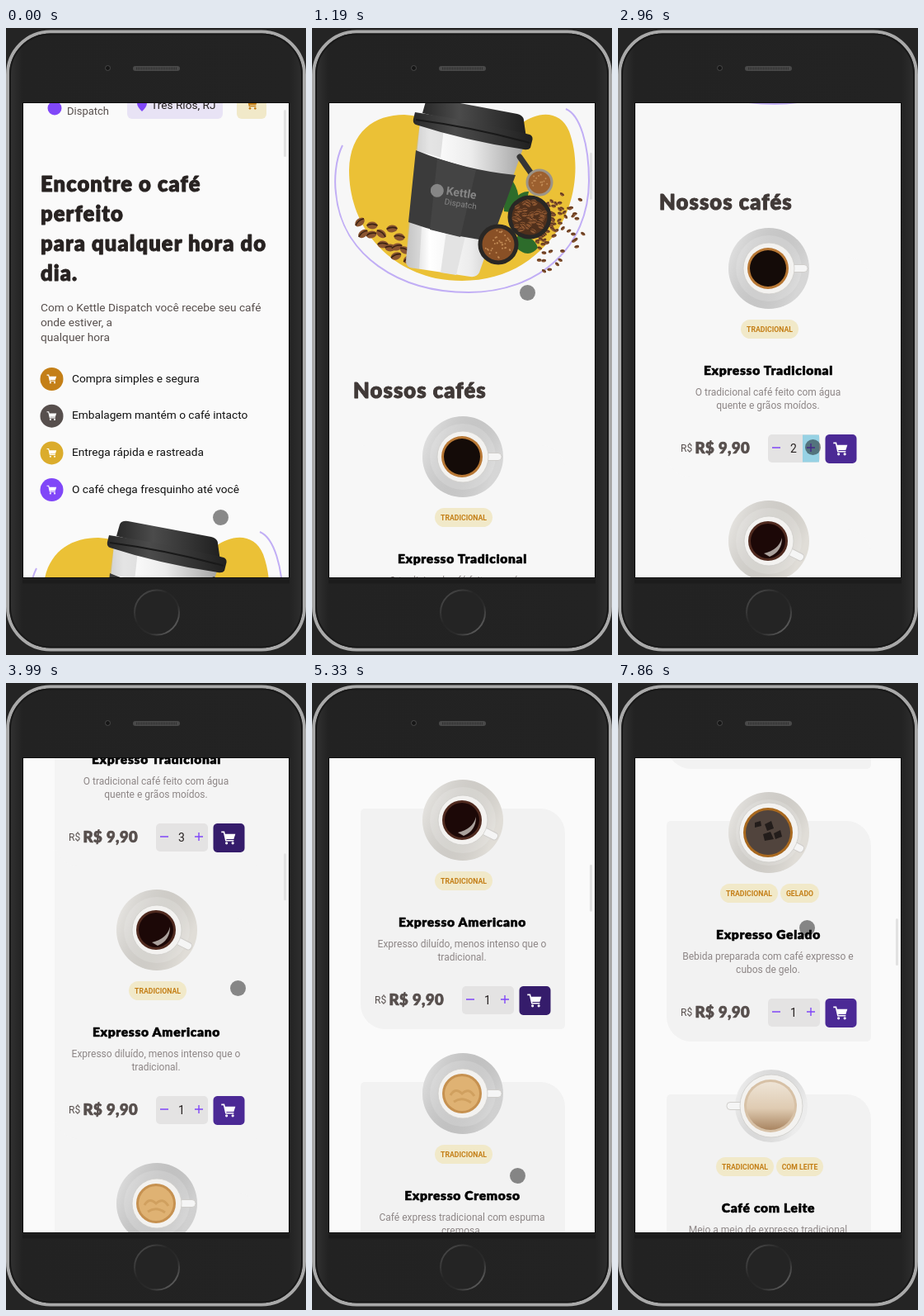
Animation, 364 px wide and 759 px high, one loop 8 s. Source, as an HTML page:

```html
<!DOCTYPE html>
<html lang="pt-BR">
<head>
<meta charset="utf-8">
<title>Cafés</title>
<style>
  html, body { margin: 0; width: 100%; height: 100%; overflow: hidden; background: #242424; }
  svg { display: block; }
  #stage { width: 364px; height: 759px; font-family: Roboto, sans-serif; }
  .display {
    font-family: Lato, sans-serif; font-weight: 900; letter-spacing: .043em;
    stroke-width: .035em; stroke-linejoin: round;
  }
  .hero { font-size: 25.5px; fill: #272221; stroke: #272221; }
  .section { font-size: 25.5px; fill: #403937; stroke: #403937; }
  .name { font-size: 15.6px; fill: #000; stroke: #000; }
  .price { font-size: 18.4px; letter-spacing: .025em; fill: #574f4d; stroke: #574f4d; }
  .lead { font-size: 13.7px; fill: #574f4d; }
  .item { font-size: 13.7px; fill: #111; }
  .desc { font-size: 12px; fill: #8d8686; }
  .tag { font-size: 8.7px; font-weight: 700; fill: #c47f17; }
  .mid { text-anchor: middle; }
  .sign { stroke: #8047f8; stroke-width: 1.4; }
</style>
</head>
<body>
<svg id="stage" viewBox="0 0 364 759">
  <defs>
    <symbol id="cart" viewBox="0 0 24 24">
      <path d="M1 3h4l3 13h12" fill="none" stroke="currentColor" stroke-width="2"/>
      <path d="M5.5 6H22.5l-2.5 8H7.5z" fill="currentColor"/>
      <circle cx="9" cy="20" r="2" fill="currentColor"/>
      <circle cx="18.5" cy="20" r="2" fill="currentColor"/>
    </symbol>
    <linearGradient id="shell">
      <stop offset="0" stop-color="#343434"/><stop offset=".05" stop-color="#222"/>
      <stop offset=".95" stop-color="#232323"/><stop offset="1" stop-color="#303030"/>
    </linearGradient>
    <linearGradient id="home" x2="1" y2="1">
      <stop offset="0" stop-color="#555"/><stop offset=".4" stop-color="#252525"/>
      <stop offset=".65" stop-color="#2b2b2b"/><stop offset="1" stop-color="#777"/>
    </linearGradient>
    <linearGradient id="lid">
      <stop offset="0" stop-color="#292929"/><stop offset=".35" stop-color="#4b4b4b"/>
      <stop offset=".7" stop-color="#343434"/><stop offset="1" stop-color="#202020"/>
    </linearGradient>
    <linearGradient id="paper">
      <stop offset="0" stop-color="#c8c8c8"/><stop offset=".2" stop-color="#fff"/>
      <stop offset=".55" stop-color="#ececec"/><stop offset="1" stop-color="#a4a4a4"/>
    </linearGradient>
    <linearGradient id="milk" x2="0" y2="1">
      <stop offset="0" stop-color="#eee4d6"/><stop offset=".55" stop-color="#dfcbb2"/>
      <stop offset="1" stop-color="#a98561"/>
    </linearGradient>
    <linearGradient id="shade" x2="1" y2=".4">
      <stop offset="0" stop-color="#fff" stop-opacity=".45"/>
      <stop offset="1" stop-color="#000" stop-opacity=".04"/>
    </linearGradient>
  </defs>

  <rect width="364" height="759" fill="#242424"/>
  <rect x="2" y="4.5" width="360" height="748" rx="52" fill="url(#shell)" stroke="#a9a9a9" stroke-width="4"/>
  <rect x="5" y="7.5" width="354" height="742" rx="49" fill="none" stroke="#191919" stroke-width="2"/>
  <circle cx="123.500" cy="48.500" r="3" fill="#161616" stroke="#4a4a4a"/>
  <rect x="154" y="46" width="57" height="6" rx="3" fill="#494949"/>
  <path d="M158 49h50" stroke="#303030" stroke-width="3" stroke-dasharray="1 1"/>
  <rect x="20" y="90" width="324" height="576" fill="#0d0d0d"/>
  <path d="M20 670h324" stroke="#1c1c1c" stroke-width="5"/>
  <circle cx="183" cy="707.500" r="27" fill="#242424" stroke="url(#home)" stroke-width="2"/>

  <svg x="21" y="91" width="322" height="574" viewBox="21 91 322 574">
    <rect id="paperBg" x="21" y="91" width="322" height="574"/>
    <rect id="strip" x="21" y="91" width="38" height="574" fill="#fafafa"/>
    <g id="page">
      <circle cx="59" cy="97" r="8.500" fill="#8047f8"/>
      <text x="74" y="105" font-size="13" fill="#574f4d">Dispatch</text>
      <rect x="147" y="74" width="116" height="36" rx="6" fill="#e8e3f5"/>
      <path d="M165 101c-4-4-6-7-6-10a6 6 0 0 1 12 0c0 3-2 6-6 10z" fill="#8047f8"/>
      <text x="176" y="98" font-size="13.700" fill="#272221">Três Rios, RJ</text>
      <rect x="280" y="74" width="36" height="36" rx="6" fill="#f1e9c9"/>
      <use href="#cart" x="290" y="84" width="16" height="16" color="#c47f17"/>

      <g class="display hero">
        <text x="42" y="198">Encontre o café</text><text x="42" y="234">perfeito</text>
        <text x="42" y="270">para qualquer hora do</text><text x="42" y="306">dia.</text>
      </g>
      <g class="lead">
        <text x="42" y="343">Com o Kettle Dispatch você recebe seu café</text>
        <text x="42" y="361">onde estiver, a</text><text x="42" y="379">qualquer hora</text>
      </g>
      <g id="perks"></g>

      <g transform="translate(0 512)">
        <path d="M45 172C46 125 76 105 112 105C155 108 200 136 238 133C256 104 298 91 312 125C328 168 318 226 286 260C254 297 206 313 150 303C88 289 45 238 45 172Z" fill="#ebc136"/>
        <path d="M37 142C28 160 27 185 29 200C36 275 105 320 190 320C275 320 336 265 336 185C336 140 325 105 308 98" fill="none" stroke="#c1aef5" stroke-width="2"/>
        <g id="beans"></g>
        <path d="M233 222q-1-22 11-36q11 17 4 38zM241 214q10-17 22-16q-2 15-17 26zM250 250q20 2 24 16q-12 15-28-2z" fill="#2d6c2b"/>
        <path d="M131 114L257 143L203 296Q200 302 192 301L119 290Q114 288 114 282Z" fill="url(#paper)"/>
        <path d="M131 114L160 121L156 157L126 148ZM117 235L133 240L130 292L119 290Q114 288 114 282Z" fill="#bbb" fill-opacity=".4"/>
        <path d="M163 246L186 252L175 299L156 296Z" fill="#e3e3e3"/>
        <path d="M126 148Q185 172 247 178L218 258Q165 252 117 235Z" fill="#3b3b3b"/>
        <path d="M152 158L199 172L180 253L143 244Z" fill="#444"/>
        <path d="M134 103L138 89Q140 84 148 85L249 104Q257 106 257 112L260 133Z" fill="url(#lid)"/>
        <path d="M125 102Q194 112 264 129Q269 131 267 137L265 145Q263 148 257 147Q188 137 126 117Q122 115 123 110Z" fill="url(#lid)"/>
        <path d="M126 111Q194 120 264 139" fill="none" stroke="#191919" stroke-width="2"/>
        <g transform="rotate(9 153 196)" fill="#868686">
          <circle cx="152" cy="197" r="8"/>
          <text x="163" y="200" font-size="14" font-weight="700">Kettle</text>
          <text x="163" y="212" font-size="10">Dispatch</text>
        </g>
        <path d="M252 156L266 176" stroke="#353535" stroke-width="7" stroke-linecap="round"/>
        <g stroke="#292725">
          <circle cx="276" cy="187" r="15" fill="#9c602f" stroke="#9c9488" stroke-width="3"/>
          <circle cx="264" cy="229" r="24" fill="#50301c" stroke-width="5"/>
          <circle cx="226" cy="262" r="22" fill="#895026" stroke-width="5"/>
        </g>
        <g id="grounds"></g>
      </g>

      <text class="display section" x="50" y="960">Nossos cafés</text>
      <g id="cards"></g>
    </g>
    <rect id="bar" x="337" width="3" height="57" rx="1.500" fill="#e2e2e2"/>
    <circle id="cursor" r="9.500" fill="#000" fill-opacity=".45"/>
  </svg>
</svg>

<script>
const $ = id => document.getElementById(id);

let seed = 11;
const rand = (lo, hi) => {
  seed = (seed * 16807) % 2147483647;
  return lo + (hi - lo) * seed / 2147483647;
};

const perks = [
  ['Compra simples e segura', '#c47f17'], ['Embalagem mantém o café intacto', '#574f4d'],
  ['Entrega rápida e rastreada', '#dbac2c'], ['O café chega fresquinho até você', '#8047f8']
];
$('perks').innerHTML = perks.map(([label, color], i) => {
  const y = 425 + 44.7 * i;
  return `<circle cx="55.5" cy="${y}" r="14" fill="${color}"/>
    <use href="#cart" x="49" y="${y - 6.5}" width="13" height="13" color="#fff"/>
    <text class="item" x="80" y="${Math.floor(y + 4)}">${label}</text>`;
}).join('');

// Coffee beans: a pile on the left, loose ones on the right, grains in the scoops
const bean = (x, y, r) => `<g transform="translate(${x} ${y}) rotate(${rand(-40, 50)})">
  <ellipse rx="${r}" ry="${r * .68}" fill="#8a5531"/>
  <path d="M${-r} 0Q0 ${-r * .5} ${r} 0" fill="none" stroke="#3c2213" stroke-width="${r / 4}"/></g>`;
const pile = [[58,235], [73,239], [72,250], [62,249], [84,249], [97,243], [106,253], [86,262],
  [95,266], [103,265], [102,276], [113,269], [117,280], [133,281], [123,285]];
const around = (cx, cy, n, near, far, from, to, bias, draw) => Array.from({ length: n }, () => {
  const a = rand(from, to), d = near + (far - near) * rand(0, 1) ** bias;
  return draw(cx + d * Math.cos(a), cy + d * Math.sin(a));
}).join('');
$('beans').innerHTML = pile.map(([x, y]) => bean(x, y, 6.5)).join('') +
  around(264, 229, 65, 27, 68, -.65, 1.35, 2, (x, y) => bean(x, y, 2.8));
const grain = (x, y) => `<circle cx="${x}" cy="${y}" r="1" fill="#c18a55"/>`;
$('grounds').innerHTML = around(264, 229, 42, 0, 20, 0, 6.28, .5, (x, y) => bean(x, y, 3.4)) +
  around(226, 262, 35, 0, 17, 0, 6.28, .5, grain) + around(276, 187, 15, 0, 11, 0, 6.28, .5, grain);

const products = [
  { name: 'Expresso Tradicional', desc: ['O tradicional café feito com água', 'quente e grãos moídos.'],
    plate: '#dfdfdf', crema: '#b87835', coffee: '#140b08', brew: 25 },
  { name: 'Expresso Americano', desc: ['Expresso diluído, menos intenso que o', 'tradicional.'],
    plate: '#e9e6e0', crema: '#512b20', coffee: '#1c0807', turn: 27,
    extra: '<path d="M-5 15Q13 11 17-4Q17 13 2 19Z" fill="#aaa19c"/>' },
  { name: 'Expresso Cremoso', desc: ['Café express tradicional com espuma', 'cremosa.'],
    plate: '#d9d9d9', crema: '#c69150', coffee: '#dfb273',
    extra: '<path d="M-14 2Q-8-8 0 0Q8-8 15 3M-10 10Q0 3 11 11" fill="none" stroke="#d0a05f" stroke-width="3"/>' },
  { name: 'Expresso Gelado', desc: ['Bebida preparada com café expresso e', 'cubos de gelo.'],
    tags: [['TRADICIONAL', 124, 70], ['GELADO', 197, 47]],
    plate: '#e9e6e0', crema: '#a9691f', coffee: '#51443d', turn: 27, brew: 30,
    extra: '<path d="M-4-10l8-4 3 9-8 3zM-6 2l9-3 4 9-11 2zM7 1l8-4 2 8-8 3zM-16-12l7-2 1 6-8 2z" fill="#231d1b"/>' },
  { name: 'Café com Leite', desc: ['Meio a meio de expresso tradicional', 'com leite vaporizado.'],
    tags: [['TRADICIONAL', 119, 70], ['COM LEITE', 192, 57]],
    plate: '#f6f6f6', crema: '#d7c1a6', coffee: 'url(#milk)', turn: 180, brew: 32, size: 44, dx: 3 }
];

const drink = ({ plate, crema, coffee, turn = 0, brew = 24, size = 49, dx = 0, extra = '' }, y) =>
  `<g transform="translate(${183 + dx} ${y})">
    <circle r="${size}" fill="${plate}"/><circle r="${size}" fill="url(#shade)"/>
    <circle r="${size - 9}" fill="#fff" fill-opacity=".15"/>
    <g transform="rotate(${turn})"><rect x="27" y="-4.5" width="${turn === 180 ? 27 : 20}" height="9" rx="4" fill="#f5f5f5" stroke="#cfcdca"/></g>
    <circle r="${brew + 6}" fill="#f3f2f0" stroke="#cfcdca" stroke-width=".8"/>
    <g transform="translate(-1 0)"><circle r="${brew}" fill="${crema}"/>
    <circle r="${brew - 3}" fill="${coffee}"/>${extra}</g></g>`;

const card = (p, i) => {
  const tags = p.tags || [['TRADICIONAL', 149, 70]];
  return `<g transform="translate(0 ${Math.round(1016.6 + 330.5 * i)})">
    <path class="card" d="M64 0H277a30 30 0 0 1 30 30V262a5 5 0 0 1-5 5H89a30 30 0 0 1-30-30V5a5 5 0 0 1 5-5z"/>
    ${drink(p, 14)}
    ${tags.map(([label, x, w]) => `<rect x="${x}" y="76" width="${w}" height="23" rx="11.5" fill="#f1e9c9"/>
      <text class="tag mid" x="${x + w / 2}" y="91">${label}</text>`).join('')}
    <text class="display name mid" x="182.500" y="143">${p.name}</text>
    ${p.desc.map((line, n) => `<text class="desc mid" x="182" y="${168 + 16 * n}">${line}</text>`).join('')}
    <text x="76" y="236" font-size="12" fill="#574f4d">R$</text>
    <text class="display price" x="93.500" y="238">R$ 9,90</text>
    <rect x="182" y="215" width="63" height="34" rx="5" fill="#e4e3e3"/>
    <rect class="tap" x="224" y="215.500" width="20" height="33" fill="#97d2e4"/>
    <path class="sign" d="M187 231h10M229 231h10M234 226v10"/>
    <text class="count mid" x="213" y="237" font-size="14" fill="#272221">1</text>
    <rect class="buy" x="251.500" y="215" width="38" height="35" rx="5"/>
    <use href="#cart" x="260.500" y="223" width="19" height="19" color="#fff"/></g>`;
};
$('cards').innerHTML = products.map(card).join('');
const all = name => [...document.querySelectorAll('.' + name)];
const [cards, taps, counts, buys] = ['card', 'tap', 'count', 'buy'].map(all);

// Tracks are listed as [step, ...values]
const scrollTrack = [[0,0], [1,30], [3,250], [5,395], [8,512], [11,600], [12,611], [13,635],
  [16,740], [24,740], [25,752], [26,880], [27,1062], [28,1118], [29,1150], [31,1183],
  [33,1195], [36,1195], [37,1218], [38,1300], [39,1346], [47,1346], [48,1358], [49,1440],
  [50,1580], [51,1700], [52,1785], [53,1841]];
const cursorTrack = [[0,260,592], [1,260,547], [3,261,320], [8,261,320], [12,266,517],
  [13,266,480], [16,266,373], [17,261,390], [19,236,507], [22,236,507], [24,281,508],
  [25,281,482], [26,281,369], [33,281,369], [36,249,596], [37,249,560], [38,249,476],
  [39,249,430], [40,247,450], [42,239,563], [47,239,563], [48,238,537], [49,236,455],
  [50,233,335], [51,229,296], [53,229,296]];

function sample(track, step) {
  const i = Math.max(1, track.findIndex(p => p[0] >= step));
  const a = track[i - 1], b = track[i], t = (step - a[0]) / (b[0] - a[0]);
  return a.slice(1).map((v, n) => v + (b[n + 1] - v) * t);
}
const within = (step, from, to) => step >= from && step < to;
const show = (el, on) => el.setAttribute('visibility', on ? 'visible' : 'hidden');

function render(step) {
  const [scroll] = sample(scrollTrack, step), [x, y] = sample(cursorTrack, step);
  $('page').setAttribute('transform', `translate(0 ${-Math.round(scroll)})`);
  $('cursor').setAttribute('transform', `translate(${x + .5} ${y + .5})`);
  $('bar').setAttribute('y', 99 + scroll * .101);
  show($('bar'), !within(step, 16, 25) && !within(step, 39, 48));

  const muted = within(step, 4, 25), striped = within(step, 25, 33);
  const bg = muted ? '#f7f7f7' : striped ? '#f4f4f4' : '#fafafa';
  $('paperBg').setAttribute('fill', bg);
  show($('strip'), striped);
  cards.forEach(el => el.setAttribute('fill', muted || striped ? bg : '#f2f2f2'));

  counts[0].textContent = step < 20 ? 1 : step < 22 ? 2 : 3;
  counts[2].textContent = Math.min(5, Math.max(1, step - 40));
  taps.forEach((el, i) => show(el, i === 0 && within(step, 20, 23) || i === 2 && within(step, 42, 47)));
  buys.forEach((el, i) => {
    const hovered = i === 0 && step >= 24 || i === 1 && within(step, 32, 40);
    el.setAttribute('fill', hovered ? '#351c6b' : '#4b2995');
  });
}

const LOOP = 8000, STEPS = 54;
let start;
function tick(now) {
  start ??= now;
  const time = (now - start) % LOOP;
  render(Math.min(STEPS - 1, Math.floor((time + 10) * STEPS / LOOP)));
  requestAnimationFrame(tick);
}
render(0);
requestAnimationFrame(tick);
</script>
</body>
</html>
```
